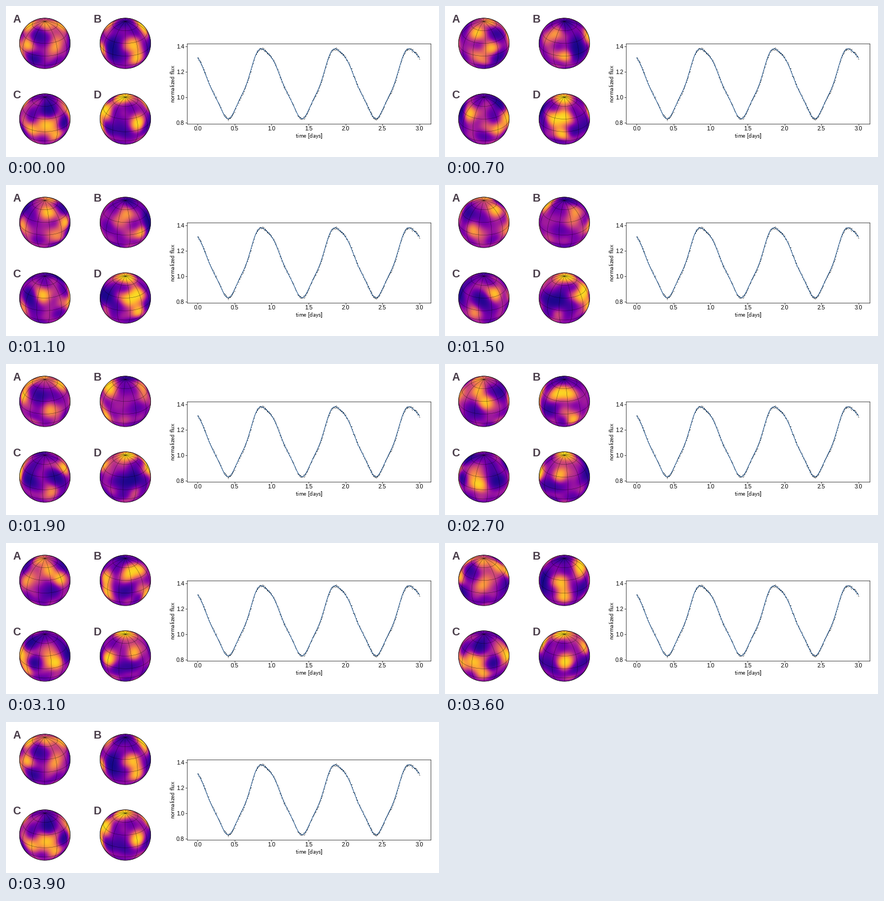
A matplotlib script that plays this animation: 780 px wide and 273 px high, repeating every 4 s.

```python
import numpy as np
import matplotlib.pyplot as plt
from matplotlib.animation import FuncAnimation
from matplotlib.patches import Circle

W, H, DPI = 780, 273, 100
FRAMES, STEP = 40, np.radians(9.2)
RADIUS = 45.7
TILT = np.radians(60)
SIN_T, COS_T = np.sin(TILT), np.cos(TILT)
SIZE = 110      # surface resolution in samples
FOCUS = 17      # larger means smaller spots


def unit(lon, lat):
    return np.array([np.cos(lat) * np.sin(lon), np.sin(lat),
                     np.cos(lat) * np.cos(lon)])


def project(lon, lat):
    """Screen x, y in radii; the far side becomes NaN."""
    x, y, z = unit(lon, lat)
    near = COS_T * y + SIN_T * z >= 0
    return np.where(near, x, np.nan), np.where(near, SIN_T * y - COS_T * z, np.nan)


def grid_lines(curves):
    """Join several curves into one path with gaps."""
    xs, ys = [], []
    for lon, lat in curves:
        x, y = project(lon, lat)
        xs += [x, [np.nan]]
        ys += [y, [np.nan]]
    return np.concatenate(xs), np.concatenate(ys)


def meridians(turn):
    lat = np.linspace(-np.pi / 2, np.pi / 2, 120)
    return grid_lines([(np.full_like(lat, turn + k * np.pi / 6), lat)
                       for k in range(12)])


def parallels():
    lon = np.linspace(-np.pi, np.pi, 361)
    return grid_lines([(lon, np.full_like(lon, np.radians(d)))
                       for d in range(-60, 90, 30)])


def disc_points():
    """Points of the sphere seen by each sample, before any rotation."""
    axis = (np.arange(SIZE) + 0.5) / SIZE * 2 - 1
    x, y = np.meshgrid(axis, -axis)
    shrink = 0.999 / np.maximum(np.hypot(x, y), 0.999)
    x, y = x * shrink, y * shrink
    z = np.sqrt(1 - x**2 - y**2)
    return np.stack([x, SIN_T * y + COS_T * z, SIN_T * z - COS_T * y], -1).reshape(-1, 3)


def rotated(points, turn):
    x, y, z = points.T
    c, s = np.cos(turn), np.sin(turn)
    return np.stack([c * x - s * z, y, s * x + c * z], -1)


class Star:
    """Key bright and dark spots (longitude, latitude) over a random texture."""

    def __init__(self, name, cx, cy, bright, dark, seed):
        self.name, self.cx, self.cy = name, cx, cy
        self.bright = unit(*np.radians(np.array(bright).T))
        self.dark = unit(*np.radians(np.array(dark).T))
        rng = np.random.default_rng(seed)
        waves = rng.normal(size=(3, 24))
        self.waves = 9 * waves / np.linalg.norm(waves, axis=0)
        self.phases = rng.uniform(0, 2 * np.pi, 24)

    def surface(self, points):
        bright = np.exp(FOCUS * (points @ self.bright - 1)).sum(1)
        dark = np.exp(FOCUS * (points @ self.dark - 1)).sum(1)
        texture = np.cos(points @ self.waves + self.phases).mean(1)
        heat = -1.0 + 2.5 * bright - 2.0 * dark + 2.6 * texture
        return (1 / (1 + np.exp(-heat))).reshape(SIZE, SIZE)


STARS = [
    Star("A", 70, 67.6,
         [(0, 79), (-44, 20), (28, 19), (117, 25), (80, 46), (-85, 48), (-70, -9), (197, 6)],
         [(-30, -16), (90, 8), (170, 44), (-26, 44)], 1),
    Star("B", 215, 67.6,
         [(26, 20), (26, -9), (88, 43), (126, 50), (133, -17), (-101, 47), (-66, -5)],
         [(-34, 24), (-25, 0), (72, 3), (0, 87)], 2),
    Star("C", 70, 204.4,
         [(9, 19), (78, 32), (104, 6), (-33, 3), (27, -10), (-101, 35), (202, -9)],
         [(15, 52), (50, 10), (146, 18), (220, 19)], 3),
    Star("D", 215, 204.4,
         [(-30, 80), (160, 77), (-64, 34), (35, 17), (100, 35), (-94, 29), (-68, -8)],
         [(-24, 0), (82, 5), (180, 20), (215, 30)], 4),
]

plt.rcParams["mathtext.fontset"] = "cm"
plt.rcParams["font.family"] = "Liberation Sans"
fig = plt.figure(figsize=(W / DPI, H / DPI), dpi=DPI, facecolor="white")
stage = fig.add_axes([0, 0, 1, 1])
stage.axis("off")

DISC = disc_points()
images, lon_lines = [], []
lat_x, lat_y = parallels()
for star in STARS:
    cx, cy = star.cx, star.cy
    img = stage.imshow(star.surface(DISC), cmap="plasma", vmin=0, vmax=1,
                       extent=(cx - RADIUS, cx + RADIUS, cy + RADIUS, cy - RADIUS),
                       aspect="auto", interpolation="bilinear")
    img.set_clip_path(Circle((cx, cy), RADIUS, transform=stage.transData))
    images.append(img)
    style = dict(color="black", lw=0.32, alpha=0.7)
    stage.plot(cx + RADIUS * lat_x, cy - RADIUS * lat_y, **style)
    lon_lines += stage.plot([], [], **style)
    stage.add_patch(Circle((cx, cy), RADIUS, fill=False, ec="black", lw=0.55))
    stage.text(cx - 57.5, cy - 37.7, star.name, weight="bold", size=14.2,
               color="#483c48", va="baseline")
stage.set_xlim(0, W)
stage.set_ylim(H, 0)


def harmonics(t):
    angles = 2 * np.pi * np.outer(t, np.arange(1, 5))
    return np.hstack([np.ones((len(t), 1)), np.cos(angles), np.sin(angles)])


# Light curve: a Fourier series through ten phases of one day
key_flux = [1.312, 1.187, 1.05, 0.93, 0.836, 0.9, 1.025, 1.175, 1.352, 1.37]
coeffs = np.linalg.lstsq(harmonics(np.arange(10) / 10), key_flux, rcond=None)[0]
days = np.linspace(0, 3, 1000)
flux = harmonics(days) @ coeffs
noise = np.random.default_rng(4).normal(0, 0.005, days.size)

LEFT, RIGHT, TOP, BOTTOM = 325.5, 764.5, 68, 212.6
chart = fig.add_axes([LEFT / W, 1 - BOTTOM / H, (RIGHT - LEFT) / W,
                      (BOTTOM - TOP) / H])
chart.plot(days, flux + noise, ".", color="black", ms=1.1, mew=0)
chart.plot(days, flux, color="#36699f", lw=0.8)
chart.set_xlim(-0.15, 3.15)
chart.set_ylim(0.795, 1.4215)
xticks, yticks = np.arange(0, 3.1, 0.5), np.arange(0.8, 1.5, 0.2)
chart.set_xticks(xticks, [f"{v:.1f}" for v in xticks])
chart.set_yticks(yticks, [f"{v:.1f}" for v in yticks])
chart.tick_params(length=2.2, width=0.5, pad=1.1, labelsize=7.4)
for spine in chart.spines.values():
    spine.set_linewidth(0.5)
label = dict(size=7.7, ha="center", va="center")
stage.text(545.5, 235, r"$\mathsf{time}$ [$\mathsf{days}$]", **label)
stage.text(300, 140.5, r"$\mathsf{normalized\ flux}$", rotation=90, **label)


def update(frame):
    turn = frame * STEP
    points = rotated(DISC, turn)
    x, y = meridians(turn)
    for star, img, line in zip(STARS, images, lon_lines):
        img.set_data(star.surface(points))
        line.set_data(star.cx + RADIUS * x, star.cy - RADIUS * y)
    return images + lon_lines


anim = FuncAnimation(fig, update, frames=FRAMES, interval=100, repeat=True,
                     repeat_delay=0, blit=False)
plt.show()
```
